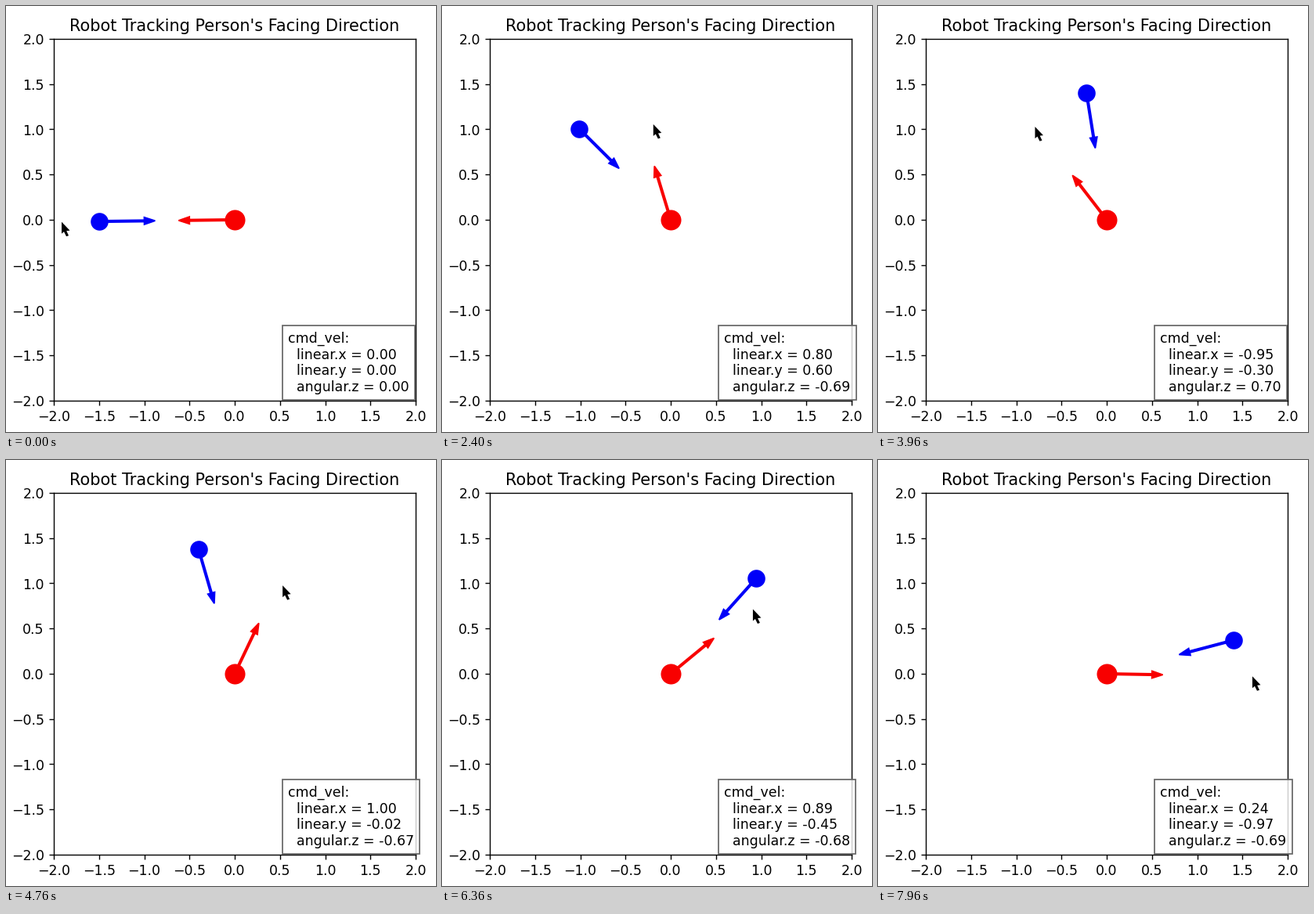
Write a matplotlib script that moves like this. It is 549 by 544 pixels and loops after 8000 ms.

```python
import numpy as np
import matplotlib.pyplot as plt
from matplotlib.animation import FuncAnimation
from matplotlib.patches import Polygon

W, H, DPI = 549, 544, 125
FRAMES, STEP_MS = 200, 40
SIDE = 462                  # side of the plot area in pixels
CENTER = (292, 273)         # stage pixel of the point (0, 0)
ORBIT = 1.5                 # distance the robot keeps from the person
SPEED = 0.87                # top speed of the robot, units per second
NEAR = 0.05                 # closer than this the robot slows down
LAG_MS = 120                # the person turns this much after the pointer
RED, BLUE = "#f80000", "#0000f8"

# pointer path: time in ms, angle in degrees, distance in pixels
SWEEPS = np.array([
    (1005, 180.7, 221), (1240, 170.4, 190), (2400, 106.9, 124),
    (2890, 80, 124), (3600, 80, 130), (3860, 127.6, 150),
    (4375, 127.6, 150), (4700, 66, 128), (5480, 46.7, 132),
    (5680, 46.7, 132), (6600, 36.9, 134), (7400, 32.2, 138),
    (7600, -1, 186),
])

CURSOR = np.array([(0, 0), (0, 15), (3, 12.5), (6, 18.5),
                   (9, 17.5), (6.2, 11.5), (10.5, 11)])


def facing(t):
    a = np.radians(np.interp(t, SWEEPS[:, 0], SWEEPS[:, 1]))
    return np.array([np.cos(a), np.sin(a)])


def pointer(t):
    reach = np.interp(t, SWEEPS[:, 0], SWEEPS[:, 2])
    return CENTER + reach * facing(t + LAG_MS) * (1, -1)


def velocity(pos, t):
    gap = ORBIT * facing(t) - pos
    return gap / max(NEAR, np.hypot(*gap))


def chase():
    path = [ORBIT * facing(0)]
    for n in range(FRAMES - 1):
        move = SPEED * STEP_MS / 1000 * velocity(path[-1], n * STEP_MS)
        path.append(path[-1] + move)
    return path


def to_data(px):
    return (px - CENTER) * (4 / SIDE, -4 / SIDE)


def message(pos, vel):
    turn = (pos[0] * vel[1] - pos[1] * vel[0]) / pos.dot(pos)
    x, y, z = (round(float(v), 2) + 0.0 for v in (*vel, turn))
    return (f"cmd_vel:\n  linear.x = {x:.2f}\n"
            f"  linear.y = {y:.2f}\n  angular.z = {z:.2f}")


def make_arrow(color):
    return ax.arrow(0, 0, 0.5, 0, width=0.02, head_width=0.08,
                    head_length=0.12, fc=color, ec=color)


def aim(arrow, start, direction):
    dx, dy = 0.5 * direction
    arrow.set_data(x=start[0], y=start[1], dx=dx, dy=dy)


fig = plt.figure(figsize=((W + 1e-4) / DPI, (H + 1e-4) / DPI), dpi=DPI,
                 facecolor="white")
ax = fig.add_axes([61 / W, 40 / H, SIDE / W, SIDE / H])
ax.set_title("Robot Tracking Person's Facing Direction")

person_arrow, robot_arrow = make_arrow(RED), make_arrow(BLUE)
ax.plot([0], [0], "o", color=RED, ms=14)
robot_dot, = ax.plot([0], [0], "o", color=BLUE, ms=12)
label = ax.text(0.648, 0.017, "", transform=ax.transAxes, fontsize=10,
                ha="left", va="bottom",
                bbox=dict(facecolor=(1, 1, 1, 0.8), edgecolor="0.4"))
cursor = Polygon(CURSOR, closed=True, fc="black", ec="none", zorder=10)
ax.add_patch(cursor)

ax.set(xlim=(-2, 2), ylim=(-2, 2))
ax.set_xticks(np.arange(-2, 2.1, 0.5))
ax.set_yticks(np.arange(-2, 2.1, 0.5))

PATH = chase()


def draw(frame):
    t = frame * STEP_MS
    pos = PATH[frame]
    aim(person_arrow, (0, 0), facing(t))
    aim(robot_arrow, pos, -pos / np.hypot(*pos))
    robot_dot.set_data([pos[0]], [pos[1]])
    cursor.set_xy(to_data(CURSOR + pointer(t)))
    label.set_text(message(pos, velocity(pos, t)))
    return person_arrow, robot_arrow, robot_dot, cursor, label


anim = FuncAnimation(fig, draw, frames=FRAMES, interval=STEP_MS,
                     init_func=lambda: draw(0), repeat=True, repeat_delay=0)
plt.show()
```
